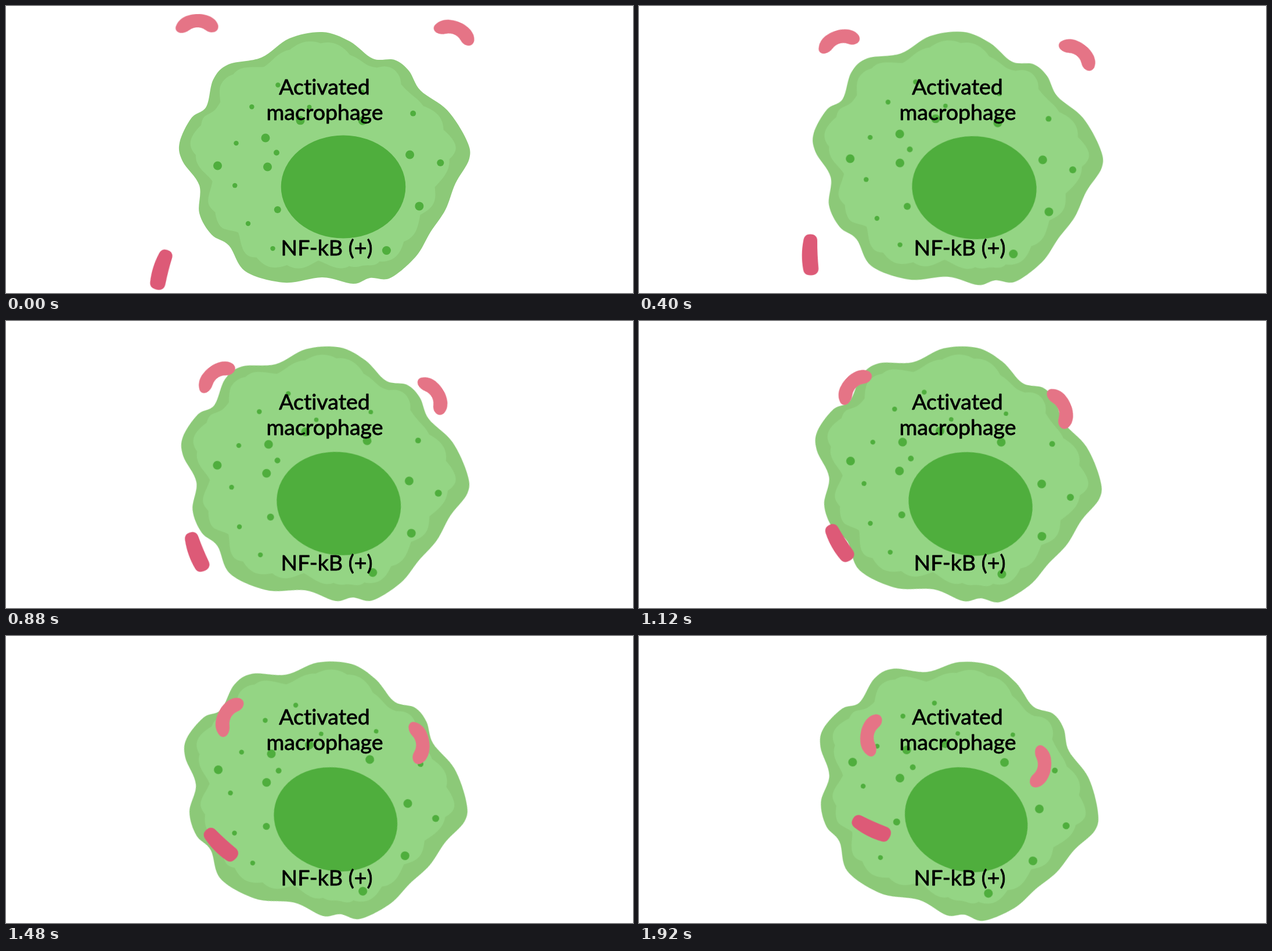
Recreate the animation shown at these times as an HTML page. Size 1080x496 px, loop 1960 ms.

```html
<!DOCTYPE html>
<html lang="en">
<head>
<meta charset="utf-8">
<title>Activated macrophage</title>
<style>
  html, body { margin: 0; width: 100%; height: 100%; overflow: hidden; background: #fff; }
  svg { display: block; width: 100%; height: 100%; }
  .rim { fill: #8cc978; }
  .body { fill: #94d584; }
  .core { fill: #4fae3d; }
  .bean { fill: #e57486; }
  .rod { fill: #dd5a77; }
  text {
    font: 400 37.5px Lato, "Open Sans", sans-serif;
    font-variant-ligatures: none;
    text-anchor: middle;
    stroke: #000; stroke-width: .8px; stroke-linejoin: round;
  }
</style>
</head>
<body>
<svg viewBox="0 0 1080 496">
  <defs>
    <path id="beanShape" d="M-36-1C-30-17-14-22 2-22C20-22 34-14 37-2C38 6 33 10 26 10C16 10 14 1 1 1C-12 1-14 10-26 10C-33 10-38 5-36-1Z"/>
  </defs>
  <g id="cell">
    <path id="rim" class="rim"/>
    <path id="body" class="body"/>
    <g id="dots" class="core"></g>
    <ellipse class="core" cx="581" cy="312.5" rx="107.3" ry="89"/>
  </g>
  <use id="leftBean" class="bean" href="#beanShape"/>
  <use id="rightBean" class="bean" href="#beanShape"/>
  <path id="rod" class="rod" d="M0-35.5C8-35.5 12-31 12-24C12-8 13 8 14.5 23C15 31 10 35 2 35.5C-7 36-11 32-12 25C-15 9-15-8-12-24C-11-31-8-35.5 0-35.5Z"/>
  <text x="548.5" y="153">Activated</text>
  <text x="549" y="196.5">macrophage</text>
  <text x="552.5" y="431">NF-kB (+)</text>
</svg>
<script>
const LOOP = 1960, STEP = 40;
const byId = id => document.getElementById(id);

// Crests and hollows of the membrane, clockwise from the top.
const lobes = [
  [545,45],[592,61],[632,91],[669,93],[694,112],[714,146],[760,180],[793,231],
  [798,264],[774,307],[757,352],[731,391],[706,433],[662,470],[627,470],[598,480],
  [545,469],[480,478],[413,459],[384,414],[354,395],[333,358],[333,310],[304,268],
  [299,236],[319,194],[345,174],[357,127],[383,101],[440,89],[488,56]
];

// Closed Catmull-Rom curve through the points.
function smooth(points) {
  const at = i => points[(i + points.length) % points.length];
  const handle = (p, a, b) => p.map((v, k) => v + (b[k] - a[k]) / 6);
  const parts = points.map((p, i) => {
    const next = at(i + 1);
    return `C${handle(p, at(i - 1), next)} ${handle(next, at(i + 2), p)} ${next}`;
  });
  return `M${points[0]}${parts.join("")}Z`;
}

// The inner edge follows the membrane, drawn inwards in small scallops.
function scalloped(outline, focus, count) {
  const samples = count * 16, length = outline.getTotalLength();
  const points = Array.from({ length: samples }, (_, i) => {
    const { x, y } = outline.getPointAtLength(length * i / samples);
    const pull = .115 - .03 * Math.abs(Math.sin(Math.PI * count * i / samples));
    return [x + (focus[0] - x) * pull, y + (focus[1] - y) * pull];
  });
  return `M${points.join("L")}Z`;
}

const dot = (x, y, r) => `<circle cx="${x}" cy="${y}" r="${r}"/>`;

// Evenly spaced dots along part of an ellipse; size(i) gives each radius.
function dotArc(count, [cx, cy], [rx, ry], from, to, size) {
  return Array.from({ length: count }, (_, i) => {
    const angle = (from + (to - from) * i / (count - 1)) * Math.PI / 180;
    return dot(cx + rx * Math.cos(angle), cy + ry * Math.sin(angle), size(i));
  }).join("");
}

byId("rim").setAttribute("d", smooth(lobes));
byId("body").setAttribute("d", scalloped(byId("rim"), [520, 215], 24));
byId("dots").innerHTML =
  dotArc(6, [500, 280], [108, 150], 253, 112, () => 4.2) +
  dotArc(6, [605, 300], [146, 152], 160, 349, i => 3.3 + 1.1 * Math.abs(i - 2.5)) +
  dotArc(5, [560, 320], [155, 130], 250, 412, () => 7.5) +
  dot(447, 228, 7.5) + dot(450.5, 278, 7.5) + dot(364.5, 276, 7.5);

// Poses are [x, y, degrees]; "last" is the pose on the final step of the loop.
function move(id, first, last, pivot = [0, 0]) {
  const reach = LOOP / (LOOP - STEP);
  const end = first.map((v, i) => v + (last[i] - v) * reach);
  const pose = ([x, y, angle]) => ({
    transform: `translate(${x}px, ${y}px) rotate(${angle}deg) translate(${-pivot[0]}px, ${-pivot[1]}px)`
  });
  const run = byId(id).animate([pose(first), pose(end)], {
    duration: LOOP, iterations: Infinity, easing: `steps(${LOOP / STEP})`
  });
  run.startTime = document.timeline.currentTime;
}

const hub = [555.8, 258.4];
move("cell", [...hub, 0], [...hub, 17.4], hub);
move("leftBean", [328.5, 36, -1], [403.5, 172, -79]);
move("rightBean", [771.5, 48, 23], [687.8, 225, 100]);
move("rod", [267.3, 455.5, 17.2], [399.8, 332.5, -63]);
</script>
</body>
</html>
```
